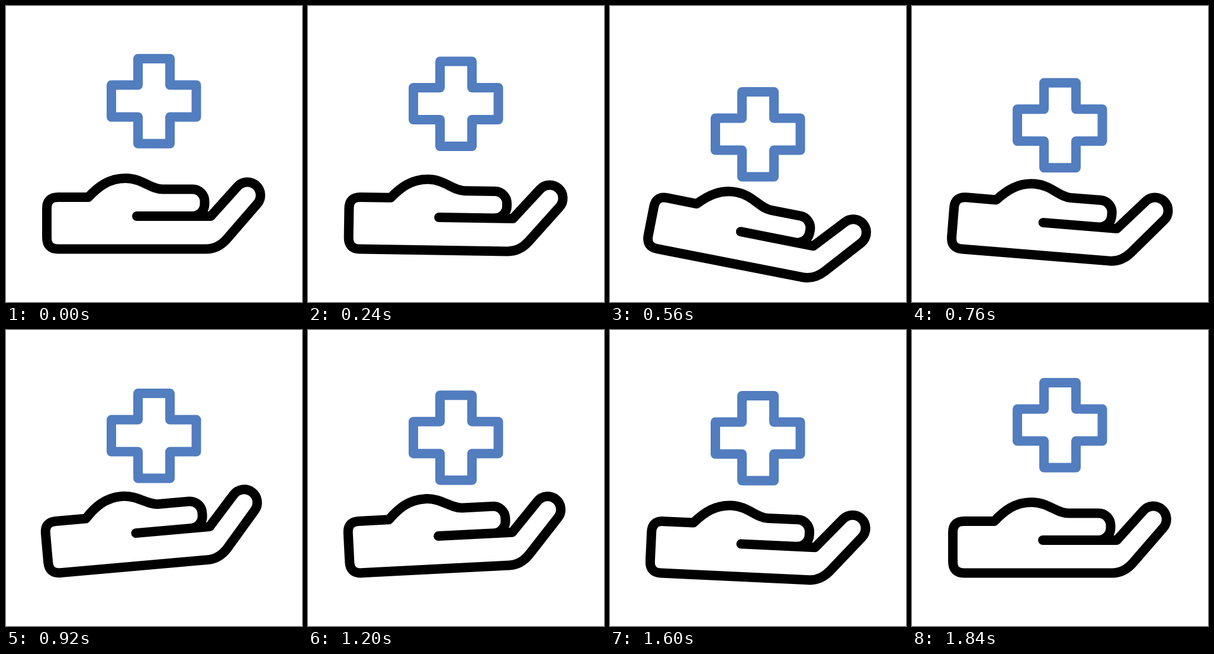
These frames come from a looping animation (500 px wide and 500 px high, 2 s). An HTML page:

```html
<!DOCTYPE html>
<html lang="en">
<head>
<meta charset="utf-8">
<title>Hand and cross</title>
<style>
  html, body { margin: 0; height: 100%; overflow: hidden; background: #fff; }
  svg { display: block; width: 100vw; height: 100vh; }
  path { fill: none; stroke-width: 16; stroke-linecap: round; stroke-linejoin: round; }
</style>
</head>
<body>
<svg viewBox="0 0 500 500">
  <path id="cross" stroke="#527dbf"
    d="M223 89H277V133.5H321.5V187.5H277V232.5H223V187.5H178V133.5H223Z"/>
  <path id="hand" stroke="#000"
    d="M221 355H346L391 305A22 22 0 0 1 424.3 334.3L373 393.5Q358 410.5 338 410.5
       H88Q69 410.5 69 391V342Q69 323 88 323H139C156 305 174 291 202 291
       C230 291 244 309.5 264 309.5H315A20.5 20.5 0 0 1 335.5 330V334.5A20.5 20.5 0 0 1 315 355"/>
</svg>
<script>
  const LOOP = 2000, STEP = 40;
  // Damped bounce: time (ms), cross drop (px), hand tilt (deg)
  const keys = [
    [160, 0, 0],
    [560, 56, 11.1],
    [1035, 13, -7.2],
    [1418, 35, 4.3],
    [1840, 0, 0],
  ];
  const cross = document.getElementById('cross');
  const hand = document.getElementById('hand');

  const ease = x => x < 0.5 ? 2 * x * x : 1 - 2 * (1 - x) ** 2;
  const mix = (a, b, p) => a + (b - a) * p;

  function poseAt(t) {
    const next = keys.findIndex(key => t < key[0]);
    if (next < 1) return [0, 0];
    const a = keys[next - 1], b = keys[next];
    const p = ease((t - a[0]) / (b[0] - a[0]));
    return [mix(a[1], b[1], p), mix(a[2], b[2], p)];
  }

  function draw(now) {
    const t = Math.floor(now % LOOP / STEP) * STEP;
    const [drop, tilt] = poseAt(t);
    cross.setAttribute('transform', `translate(0 ${drop})`);
    hand.setAttribute('transform', `rotate(${tilt} 86 367)`);
    requestAnimationFrame(draw);
  }

  draw(0);
</script>
</body>
</html>
```
